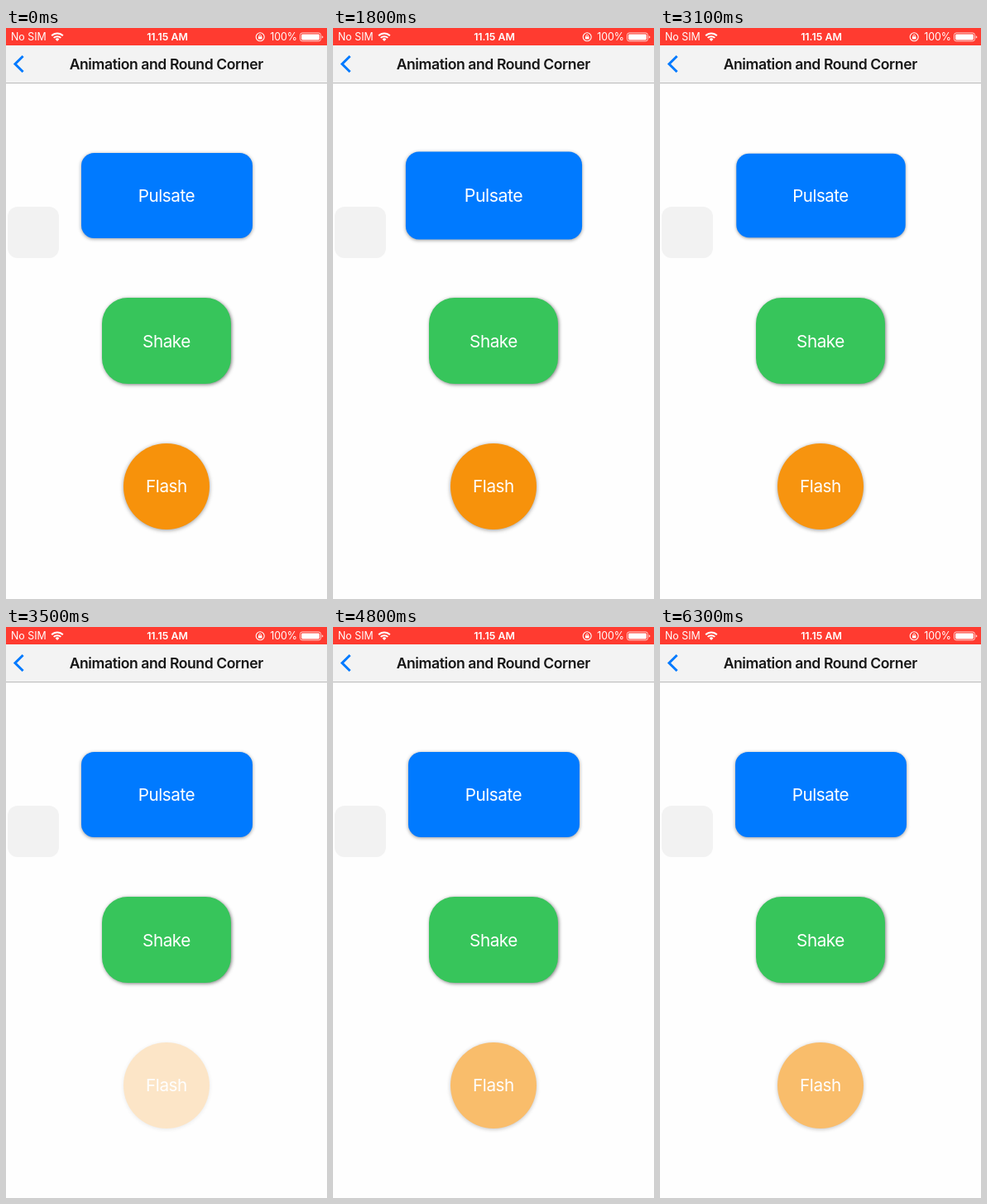
Write an HTML page that moves like this. It is 388x690 px and loops after 6400 ms.

```html
<!DOCTYPE html>
<html lang="en">
<head>
<meta charset="utf-8">
<title>Button animations</title>
<style>
  html, body { margin: 0; width: 100%; height: 100%; overflow: hidden; background: #fefefe; }
  body { position: relative; font-family: Inter, Roboto, sans-serif; }
  .bars { position: absolute; left: 0; top: 0; }
  .status { font-size: 12.4px; fill: #fff; }
  .title { font-size: 17.6px; font-weight: 600; letter-spacing: -0.42px; fill: #151515; }
  .touch {
    position: absolute; left: 2px; top: 216px; width: 62px; height: 62px;
    border-radius: 12px; background: #f2f2f2;
  }
  .button {
    position: absolute; display: flex; align-items: center; justify-content: center;
    color: #fff; font-size: 20.7px; letter-spacing: -0.45px;
  }
  #pulsate {
    left: 90.5px; top: 150.5px; width: 207px; height: 103.5px;
    border-radius: 15.5px; background: #007aff; box-shadow: 0 1px 4px rgba(0, 0, 0, .4);
  }
  #shake {
    left: 116.3px; top: 326.3px; width: 155.4px; height: 103.6px;
    border-radius: 31px; background: #37c55b; box-shadow: 1px 1px 4px rgba(0, 0, 0, .5);
  }
  #flash {
    left: 142.2px; top: 502.2px; width: 103.6px; height: 103.6px;
    border-radius: 50%; background: #f7920b; box-shadow: 0 1px 5px rgba(0, 0, 0, .4);
  }
</style>
</head>
<body>
<svg class="bars" width="388" height="68" viewBox="0 0 388 68">
  <rect width="388" height="21" fill="#ff3b30"/>
  <rect y="21" width="388" height="45.5" fill="#f3f3f3"/>
  <rect y="66" width="388" height="1" fill="#b9b9b9"/>

  <g class="status">
    <text x="6" y="15.2">No SIM</text>
    <text x="195" y="15.2" text-anchor="middle" font-weight="600">11.15 AM</text>
    <text x="352" y="15.2" text-anchor="end">100%</text>
  </g>

  <g fill="none" stroke="#fff" stroke-width="2">
    <path d="M55.2 9.2a9.6 9.6 0 0 1 13.6 0"/>
    <path d="M57.7 11.9a6.1 6.1 0 0 1 8.6 0"/>
  </g>
  <path d="M59.6 13.4a3.4 3.4 0 0 1 4.8 0L62 16z" fill="#fff"/>

  <g fill="none" stroke="#fff">
    <circle cx="307.2" cy="10.8" r="5" stroke-width="1.1"/>
    <path d="M305.9 10.5v-1a1.3 1.3 0 0 1 2.6 0v1" stroke-width=".9"/>
    <rect x="355.5" y="5.9" width="25" height="10" rx="2.6" stroke-width="1" opacity=".75"/>
  </g>
  <g fill="#fff">
    <rect x="304.9" y="10.2" width="4.6" height="3.3" rx=".5"/>
    <rect x="357" y="7.4" width="22" height="7" rx="1.3"/>
    <path d="M381.8 9.2q1.6 .5 1.6 1.7t-1.6 1.7z" opacity=".8"/>
  </g>

  <path d="M20.6 34L11 43.5l9.6 9.5" fill="none" stroke="#007aff" stroke-width="3"/>
  <text class="title" x="193.7" y="49.7" text-anchor="middle">Animation and Round Corner</text>
</svg>

<div class="touch"></div>
<div class="button" id="pulsate">Pulsate</div>
<div class="button" id="shake">Shake</div>
<div class="button" id="flash">Flash</div>

<script>
  const LOOP = 6400, STEP = 100;
  const [pulsate, shake, flash] = document.querySelectorAll('.button');

  // Position in a back-and-forth run, from 0 to 1; null when the run is not active.
  function swing(time, half, repeats) {
    if (time < 0 || time >= half * 2 * repeats) return null;
    const phase = time / half % 2;
    return phase < 1 ? phase : 2 - phase;
  }

  // Lightly damped spring from 0.95 to 1, cut off after 0.6 s.
  function springScale(p) {
    if (p === null) return 1;
    const s = p * 0.6;
    return 1 - 0.05 * Math.exp(-0.5 * s) * Math.cos(10 * s);
  }

  function shakeOffset(p) {
    return p === null ? 0 : -5.2 + 10.4 * p;
  }

  function flashOpacity(p) {
    return p === null ? 1 : 0.6 + 0.4 * Math.cos(Math.PI * p);
  }

  const start = performance.now();

  function draw(now) {
    const elapsed = Math.max(0, now - start) % LOOP;
    const t = Math.floor(elapsed / STEP) * STEP;
    pulsate.style.transform = `scale(${springScale(swing(t - 830, 600, 2))})`;
    shake.style.transform = `translateX(${shakeOffset(swing(t - 2433, 100, 2))}px)`;
    flash.style.opacity = flashOpacity(swing(t - 3050, 500, 4));
    requestAnimationFrame(draw);
  }

  draw(start);
</script>
</body>
</html>
```
